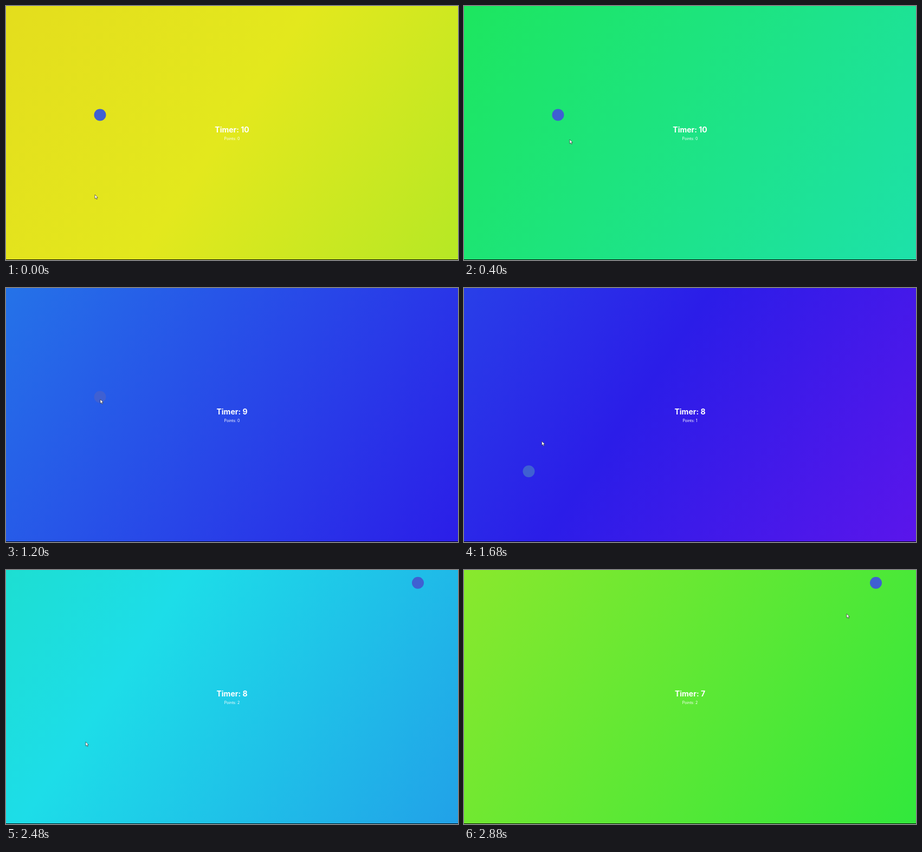
These frames come from a looping animation (834 by 470 pixels, 2.96 s). An HTML page:

```html
<!DOCTYPE html>
<html lang="en">
<head>
<meta charset="utf-8">
<title>Click the dot</title>
<style>
html, body { margin: 0; width: 100%; height: 100%; overflow: hidden; background: #000; }
#sky {
  position: absolute; left: 0; top: 0; width: 834px; height: 469px;
  background: linear-gradient(124deg, #ff2400, #e81d1d, #e8b71d, #e3e81d, #1de840, #1ddde8, #2b1de8, #dd00f3, #dd00f3);
  background-size: 1800% 1800%;
}
svg { position: absolute; left: 0; top: 0; }
text { font-family: Inter, sans-serif; fill: #fff; text-anchor: middle; }
</style>
</head>
<body>
<div id="sky"></div>
<svg width="834" height="470" viewBox="0 0 834 470">
  <text id="timer" x="417" y="234" font-size="14" font-weight="700"></text>
  <text id="points" x="417" y="247.6" font-size="7"></text>
  <circle id="dot" r="11" fill="#3f60d2"/>
  <path id="cursor" d="M0 0V7.6L1.8 6L3 8.8L4.3 8.2L3.1 5.5H5.4Z" fill="#fff" stroke="#222" stroke-width=".6"/>
</svg>
<script>
const LOOP = 2960, STEP = 80, SWEEP = 2500, SWEEP_OFFSET = 460;
const [sky, timer, points, dot, cursor] =
  ['sky', 'timer', 'points', 'dot', 'cursor'].map(id => document.getElementById(id));

const dotSpots = [[173.5, 201.5], [119.5, 339.3], [760, 23.7]];
const clicks = [1280, 2240];
const ticks = [640, 1640, 2640];

// time, x, y
const cursorPath = [
  [0, 164, 349], [400, 195, 247], [720, 176, 207], [1200, 174, 206], [1360, 174, 206],
  [1920, 124, 334], [2320, 124, 334], [2480, 147, 318], [2880, 706, 81]
];

const passed = (times, t) => times.filter(time => t >= time).length;
const mix = (a, b, k) => a + (b - a) * k;

// CSS "ease": cubic-bezier(.25, .1, .25, 1)
function ease(x) {
  let low = 0, high = 1;
  for (let i = 0; i < 24; i++) {
    const s = (low + high) / 2;
    if (.75 * s * (1 - s) + s ** 3 < x) low = s; else high = s;
  }
  return .3 * low * (1 - low) ** 2 + 3 * low * low * (1 - low) + low ** 3;
}

function cursorAt(t) {
  const next = cursorPath.findIndex(p => p[0] > t);
  if (next < 0) return cursorPath.at(-1).slice(1);
  const [t0, x0, y0] = cursorPath[next - 1], [t1, x1, y1] = cursorPath[next];
  const u = (t - t0) / (t1 - t0), k = u * u * (3 - 2 * u);
  return [mix(x0, x1, k), mix(y0, y1, k)];
}

function draw(t) {
  const phase = (t + SWEEP_OFFSET) / SWEEP;
  const k = phase < 1 ? ease(phase) : 1 - ease(phase - 1);
  sky.style.backgroundPosition = `${100 * k}% ${mix(82, 19, k)}%`;

  const score = passed(clicks, t);
  timer.textContent = `Timer: ${10 - passed(ticks, t)}`;
  points.textContent = `Points: ${score}`;
  dot.setAttribute('transform', `translate(${dotSpots[score]})`);
  cursor.setAttribute('transform', `translate(${cursorAt(t)})`);
}

const start = performance.now();
function frame() {
  const t = (performance.now() - start) % LOOP;
  draw(Math.floor(t / STEP) * STEP);
  requestAnimationFrame(frame);
}
frame();
</script>
</body>
</html>
```
